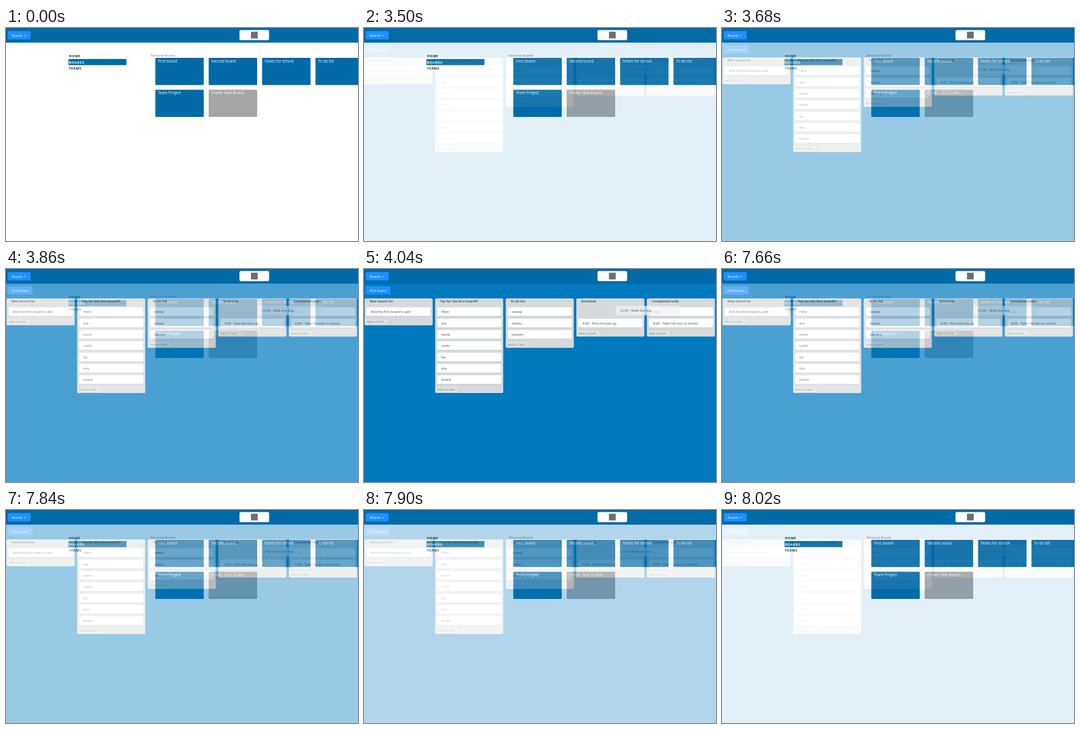
An HTML page with a canvas for the animation above (8.08 s loop, 600 px wide and 364 px high).

```html
<!DOCTYPE html>
<html lang="en">
<head>
<meta charset="utf-8">
<title>Boards</title>
<style>
html, body { margin: 0; width: 100%; height: 100%; overflow: hidden; background: #fff; }
canvas { display: block; width: 600px; height: 364px; }
</style>
</head>
<body>
<canvas id="stage"></canvas>
<script>
const W = 600, H = 364;
const LOOP = 8080, HOLD = 3500, STEP = 60, HALF = LOOP / 2;
const FONT = '"Open Sans", "Noto Sans", sans-serif';
const NAVY = '#026aa7', BLUE = '#0079bf', BUTTON = '#1e90ff';
const scale = window.devicePixelRatio || 1;

const lists = [
  ['New board list', ["And the first board's card"]],
  ['Yay for the first board!!!', ['Here', 'Are', 'some', 'cards', 'for', 'this', 'board']],
  ['To do list', ['sweep', 'dishes', 'laundry']],
  ['Schedule:', ['', '4:45 - Pick the kids up']],
  ['Completed tasks', ['nap', '8:00 - Take the kids to school']]
];
const tiles = ['First board', 'Second board', 'Notes for school', 'To do list', 'Team Project', 'Create New Board...'];

function setup(canvas) {
  canvas.width = W * scale;
  canvas.height = H * scale;
  const c = canvas.getContext('2d');
  c.scale(scale, scale);
  return c;
}

function box(c, x, y, w, h, r, fill) {
  c.fillStyle = fill;
  c.beginPath();
  c.roundRect(x, y, w, h, r);
  c.fill();
}

// y is the baseline
function label(c, str, x, y, size, fill, weight = 400, spacing = 0) {
  c.font = `${weight} ${size}px ${FONT}`;
  c.letterSpacing = spacing + 'px';
  c.fillStyle = fill;
  c.fillText(str, x, y);
}

function header(c) {
  box(c, 0, 0, W, 25, 0, NAVY);
  box(c, 3, 5.3, 39, 14.2, 2, BUTTON);
  label(c, 'Boards', 10, 14.6, 5.6, '#fff');
  c.strokeStyle = '#fff';
  c.lineWidth = 0.7;
  c.beginPath();
  c.moveTo(30.8, 12);
  c.lineTo(32.5, 13.6);
  c.lineTo(34.2, 12);
  c.stroke();
  box(c, 398, 3.4, 50.5, 17.4, 2.5, '#fff');
  box(c, 417.5, 6.3, 11.5, 11.5, 0, '#6e6e72');
}

function drawHome(c) {
  box(c, 0, 0, W, H, 0, '#fff');
  header(c);
  box(c, 106.5, 53, 98.8, 10.5, 0, NAVY);
  ['HOME', 'BOARDS', 'TEAMS'].forEach((name, i) =>
    label(c, name, 107.2, 49.8 + i * 10.75, 5.8, i === 1 ? '#fff' : '#222', 700, 0.45));
  label(c, 'Personal Boards', 246.8, 49, 5.5, '#777');
  tiles.forEach((name, i) => {
    const x = 254.5 + (i % 4) * 91, y = 51 + Math.floor(i / 4) * 54.5;
    box(c, x, y, 82.6, 46.5, 1.3, i === 5 ? '#a5a5a5' : NAVY);
    label(c, name, x + 4.4, y + 7.9, 6.5, '#fff');
  });
}

function card(c, text, x, y) {
  box(c, x, y + 0.6, 109.6, 15.2, 2, '#b9bdbf');
  box(c, x, y, 109.6, 15, 2, '#fff');
  label(c, text, x + 7.2, y + 9.8, 5.75, '#444');
}

function drawList(c, [title, cards], x) {
  const end = 65.6 + cards.length * 19.33;
  box(c, x, 50.3, 116, end + 11.2 - 50.3, 2.2, '#d7dadc');
  label(c, title, x + 8.3, 57.2, 5.75, '#333', 600);
  cards.forEach((text, i) => {
    if (text) card(c, text, x + 3.2, 65.6 + i * 19.33);
  });
  box(c, x + 0.3, end, 40, 10.6, 1, '#b4b7b9');
  box(c, x + 0.7, end + 0.4, 39.2, 9.8, 0.8, '#e1e3e4');
  label(c, 'Add a Card...', x + 3.2, end + 7.3, 5.7, '#777');
}

function drawBoard(c) {
  box(c, 0, 0, W, H, 0, BLUE);
  header(c);
  box(c, 2.5, 29.6, 42.6, 13.8, 2, BUTTON);
  label(c, 'First board', 9.5, 38.6, 5.65, '#fff');
  lists.forEach((list, i) => drawList(c, list, 1 + i * 120.3));
  // card being dragged
  box(c, 429, 63, 109.6, 16, 2, 'rgba(240,242,244,0.72)');
  label(c, '12:45 - Walk the dog', 435.8, 73.4, 5.75, '#555');
}

const ctx = setup(document.getElementById('stage'));
const home = document.createElement('canvas');
const board = document.createElement('canvas');
const homeCtx = setup(home), boardCtx = setup(board);

function paint() {
  drawHome(homeCtx);
  drawBoard(boardCtx);
}

// share of the board view: stepped crossfades between two holds
function boardShare(t) {
  const u = t % HALF;
  const mix = u < HOLD ? 0 : (Math.floor((u - HOLD) / STEP) + 1) / 10;
  return t < HALF ? mix : 1 - mix;
}

let start = null;
function frame(now) {
  if (start === null) start = now;
  ctx.globalAlpha = 1;
  ctx.drawImage(home, 0, 0, W, H);
  ctx.globalAlpha = boardShare((now - start) % LOOP);
  ctx.drawImage(board, 0, 0, W, H);
  requestAnimationFrame(frame);
}

paint();
requestAnimationFrame(frame);
</script>
</body>
</html>
```
